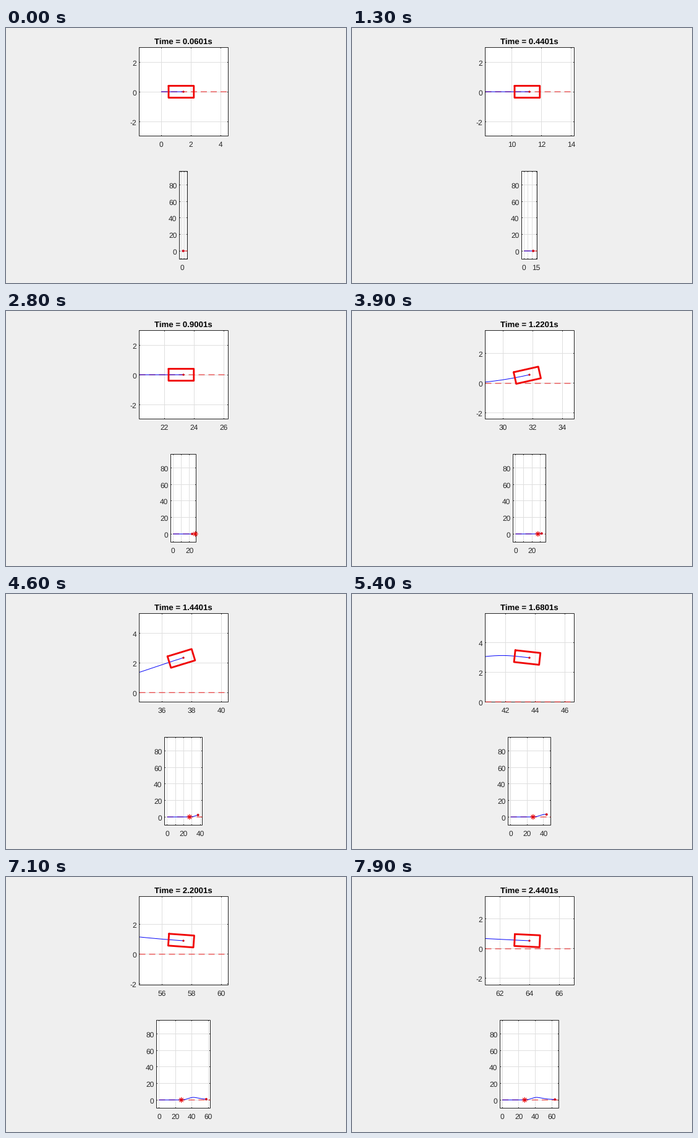
A matplotlib script for the animation above (8000 ms loop, 550 px wide and 412 px high).

```python
import numpy as np
import matplotlib.pyplot as plt
from matplotlib.animation import FuncAnimation
from matplotlib.patches import Circle, Rectangle

W, H, DPI = 550, 412, 100
PX = 72 / DPI  # points per pixel
FRAMES, INTERVAL = 80, 100
BG, INK, GRID = "#efefef", "#262626", "#dfdfdf"
RED, BLUE = "#f00808", "#0808f8"
STAR_X = 27.2

plt.rcParams.update({"font.family": "Liberation Sans", "path.snap": False,
                     "text.hinting": "none", "toolbar": "None"})

# (time, lead over 25 m/s, slope) and (x, lateral offset, slope)
LEAD = np.array([(.06, 0, .1), (.44, .19, .9), (.9, .77, 1.5),
                 (1.22, 1.27, 1.4), (1.68, 1.60, 1.0), (1.96, 1.98, 1.7),
                 (2.44, 2.98, 2.3)])
SWERVE = np.array([(27, 0, 0), (28.8, .09, .1), (31.77, .58, .225),
                   (41.8, 3.12, 0), (43.6, 2.97, -.11), (48, 2.13, -.2),
                   (51, 1.61, -.16), (61, .69, -.055), (64, .54, -.047)])


def hermite(v, knots):
    p, q, m = knots.T
    v = np.clip(v, p[0], p[-1])
    i = np.clip(np.searchsorted(p, v, side="right") - 1, 0, len(p) - 2)
    h = p[i + 1] - p[i]
    s = (v - p[i]) / h
    return (q[i] * (1 + 2 * s) * (1 - s) ** 2 + m[i] * h * s * (1 - s) ** 2
            + q[i + 1] * s * s * (3 - 2 * s) - m[i + 1] * h * s * s * (1 - s))


def car_x(t):
    return 25 * t + hermite(t, LEAD)


def car_y(x):
    return hermite(x, SWERVE)


def heading(x):
    e = .01
    return np.arctan((car_y(x + e) - car_y(x - e)) / (2 * e))


def crisp(v, lo, hi):
    return min(max(np.floor(v) + .5, lo), hi)


def multiples(lo, hi, step):
    first, last = int(np.ceil(lo / step)), int(np.floor(hi / step))
    return [k * step for k in range(first, last + 1)]


fig = plt.figure(figsize=(W / DPI, H / DPI), dpi=DPI, facecolor=BG)
stage = fig.add_axes([0, 0, 1, 1])


def line(x, y, color, width=1, **kw):
    kw.setdefault("solid_capstyle", "butt")
    return stage.plot(x, y, color=color, lw=width * PX, **kw)[0]


def label(x, y, s, ha="center", size=12, **kw):
    kw.setdefault("color", INK)
    stage.text(x, y, s, ha=ha, va="baseline", fontsize=size * PX, **kw)


class Panel:
    """Plot box in stage pixels with an equal-aspect data mapping."""

    def __init__(self, box, origin, scale):
        self.l, self.t, self.r, self.b = box
        self.origin, self.scale = origin, scale
        self.clip = Rectangle((self.l, self.t), self.r - self.l,
                              self.b - self.t, transform=stage.transData)

    def px(self, x):
        return self.origin[0] + self.scale * np.asarray(x)

    def py(self, y):
        return self.origin[1] - self.scale * np.asarray(y)

    def frame(self, xticks, yticks, step, skip=1):
        l, t, r, b = self.l, self.t, self.r, self.b
        stage.add_patch(Rectangle((l, t), r - l, b - t, fc="white", ec="none"))
        xs = [crisp(self.px(v), l, r) for v in xticks]
        ys = [crisp(self.py(v), t, b) for v in yticks]
        for x in xs:
            line([x, x], [t, b], GRID)
        for y in ys:
            line([l, r], [y, y], GRID)
        for v, x in zip(xticks, xs):
            line([x, x], [b, b - 1.5], INK)
            line([x, x], [t, t + 1.5], INK)
            if v // step % skip == 0:
                label(self.px(v), b + 17.5, str(v))
        for v, y in zip(yticks, ys):
            line([l, l + 1.5], [y, y], INK)
            line([r, r - 1.5], [y, y], INK)
            label(l - 4, y + 5, str(v), ha="right")
        line([l, r, r, l, l], [t, t, b, b, t], INK,
             solid_joinstyle="miter", solid_capstyle="projecting")

    def curve(self, x, y, color, width=1, **kw):
        art = line(self.px(x), self.py(y), color, width, **kw)
        art.set_clip_path(self.clip)

    def track(self, x):
        start = max(self.px(0), self.l)
        art = line([start, self.r], [self.py(0)] * 2, "#e81818",
                   dashes=(10, 6), dash_capstyle="butt")
        art.set_clip_path(self.clip)
        xs = np.linspace(0, x, 500)
        self.curve(xs, car_y(xs), BLUE)

    def dot(self, x, y, radius):
        stage.add_patch(Circle((self.px(x), self.py(y)), radius,
                               fc="#d01020", ec="none", zorder=3))


def close_up(x, y):
    p = Panel((215.5, 31.5, 359.5, 174.5), (287 - 24 * x, 103 + 24 * y), 24)
    p.frame(multiples(x - 3, x + 3, 2), multiples(y - 3, y + 3, 2), 2)
    p.track(x)
    a = heading(x)
    u = np.array([-1, .7, .7, -1, -1])
    v = np.array([.4, .4, -.4, -.4, .4])
    p.curve(x + u * np.cos(a) - v * np.sin(a),
            y + u * np.sin(a) + v * np.cos(a), RED, 2.9,
            solid_joinstyle="round", solid_capstyle="round")
    p.dot(x, y, 1.7)


def overview(x, y):
    scale = 1.333
    span = x + 8
    half = scale * span / 2
    edge = np.round(half - .5) + .5
    p = Panel((287 - edge, 231.5, 287 + edge, 373.5),
              (287 - half + 3 * scale, 360.2), scale)
    step = 2 if span < 12 else 5 if span < 25 else 10 if span < 50 else 20
    skip = int(np.ceil(18 / (step * scale)))
    p.frame(multiples(-3, x + 5, step), multiples(-9, 95, 20), step, skip)
    p.track(x)
    p.dot(x, y, 2)
    if x + 5 >= STAR_X:
        cx, cy = p.px(STAR_X), p.py(0)
        for a in np.arange(4) * np.pi / 4:
            dx, dy = 4.4 * np.cos(a), 4.4 * np.sin(a)
            line([cx - dx, cx + dx], [cy - dy, cy + dy], "#e80000", 1.2)


def draw(n):
    stage.clear()
    stage.set_axis_off()
    stage.set_xlim(0, W)
    stage.set_ylim(H, 0)
    stage.set_autoscale_on(False)
    t = .06 + .02 * int(1.51 * n)  # simulation runs in 20 ms steps
    x = float(car_x(t))
    y = float(car_y(x))
    label(287, 26, f"Time = {t + .0001:.4f}s", size=13.2, weight="bold",
          color="black")
    close_up(x, y)
    overview(x, y)
    return []


anim = FuncAnimation(fig, draw, frames=FRAMES, interval=INTERVAL,
                     repeat=True, repeat_delay=0, blit=False)
plt.show()
```
